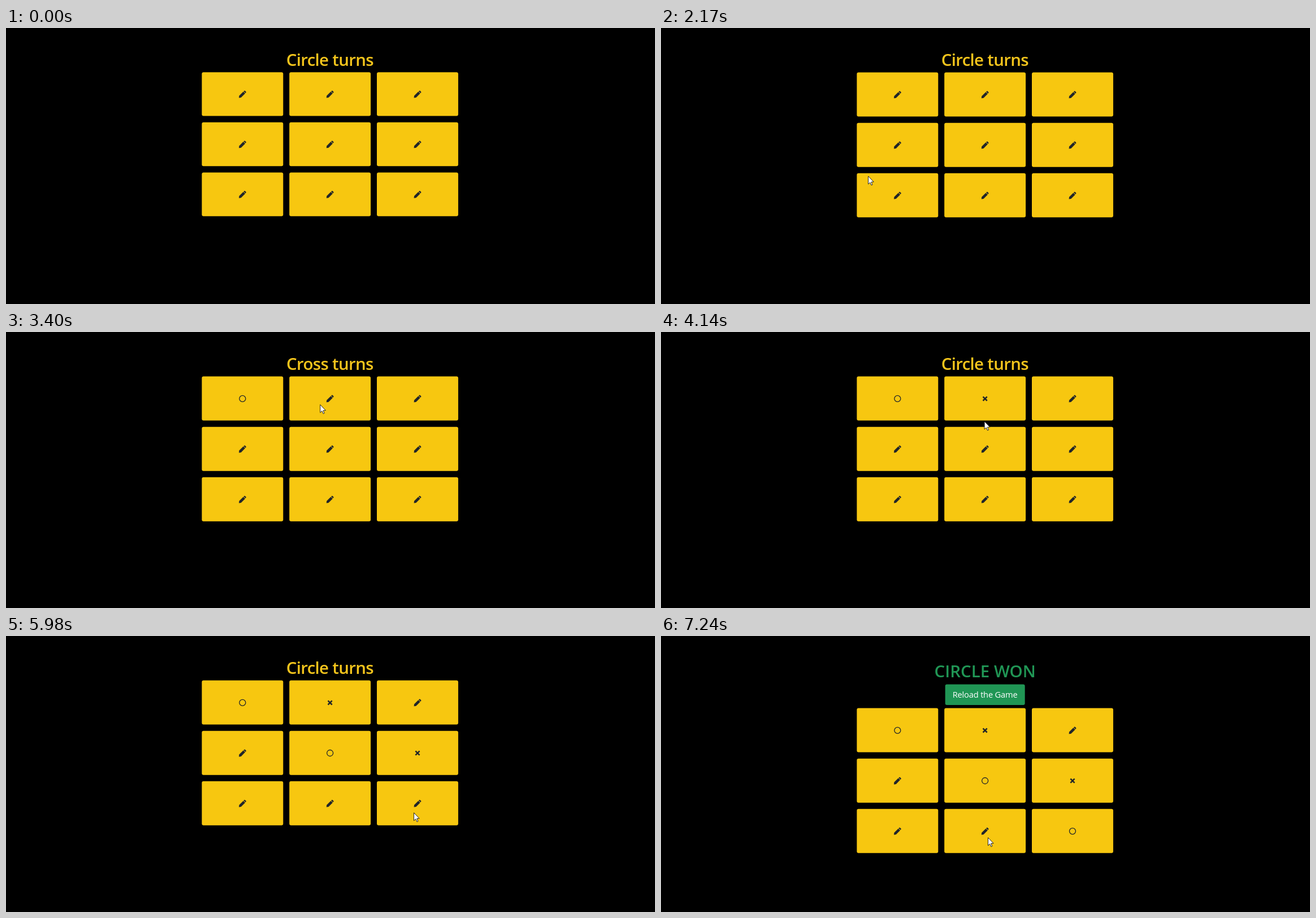
An HTML page with a canvas for the animation above (7990 ms loop, 1148 px wide and 488 px high).

```html
<!DOCTYPE html>
<html lang="en">
<head>
<meta charset="utf-8">
<title>Noughts and crosses</title>
<style>
html, body { margin: 0; width: 100%; height: 100%; overflow: hidden; background: #000; }
canvas { display: block; }
</style>
</head>
<body>
<canvas id="stage" width="1148" height="488"></canvas>
<script>
const ctx = document.getElementById('stage').getContext('2d');
const LOOP = 7990;
const YELLOW = '#f7c710', GREEN = '#209655', INK = '#212529';
const FONT = '"Open Sans", "Noto Sans", sans-serif';

const layouts = [
  { from: 0, top: 78.2, pitch: 88.6, height: 77.4, base: 66.6 },
  { from: 1370, top: 78.6, pitch: 89.1, height: 78, base: 67 },
  { from: 6170, top: 127.6, pitch: 89.1, height: 78, base: 73 }
];

const titles = [
  { from: 0, text: 'Circle turns' },
  { from: 2770, text: 'Cross turns' },
  { from: 3700, text: 'Circle turns' },
  { from: 4540, text: 'Cross turns' },
  { from: 5350, text: 'Circle turns' },
  { from: 6170, text: 'CIRCLE WON', won: true }
];

const turns = [
  { from: 2770, cell: 0, mark: ring },
  { from: 3700, cell: 1, mark: cross },
  { from: 4540, cell: 4, mark: ring },
  { from: 5350, cell: 5, mark: cross },
  { from: 6170, cell: 8, mark: ring }
];

// Pointer travels in discrete steps between rests.
const moves = [
  { from: 1880, to: 2610, steps: 11, a: [343, 321], b: [420, 123] },
  { from: 2960, to: 3480, steps: 10, a: [420, 123], b: [571, 128.6] },
  { from: 3970, to: 4540, steps: 8, a: [571, 128.6], b: [573, 220] },
  { from: 4850, to: 5190, steps: 6, a: [573, 220], b: [735, 222] },
  { from: 5680, to: 5980, steps: 4, a: [735, 222], b: [721, 312] },
  { from: 6740, to: 7240, steps: 9, a: [721, 312], b: [578, 356] }
];

const latest = (list, t) => list.filter(e => t >= e.from).pop();

function polygon(points) {
  ctx.beginPath();
  points.forEach(([x, y]) => ctx.lineTo(x, y));
  ctx.closePath();
}

function box(x, y, w, h, r, color) {
  ctx.beginPath();
  ctx.roundRect(x, y, w, h, r);
  ctx.fillStyle = color;
  ctx.fill();
}

function label(text, y, font, color, spacing) {
  ctx.font = font;
  ctx.letterSpacing = spacing + 'px';
  ctx.fillStyle = color;
  ctx.textAlign = 'center';
  ctx.fillText(text, 573.2 + spacing / 2, y);
}

function pencil() {
  ctx.fillStyle = INK;
  polygon([[-6.4, 6.4], [-5.9, 2.6], [1.4, -4.7], [4.7, -1.4], [-2.6, 5.9]]);
  ctx.fill();
  polygon([[2, -5.2], [3.3, -6.3], [4.3, -6.4], [6.4, -4.3], [6.3, -3.3], [5.2, -2]]);
  ctx.fill();
}

function ring() {
  ctx.strokeStyle = INK;
  ctx.lineWidth = 1.3;
  ctx.beginPath();
  ctx.arc(0, 0, 5.5, 0, Math.PI * 2);
  ctx.stroke();
}

function cross() {
  ctx.strokeStyle = INK;
  ctx.lineWidth = 2.5;
  ctx.beginPath();
  ctx.moveTo(-3.6, -3.6);
  ctx.lineTo(3.6, 3.6);
  ctx.moveTo(3.6, -3.6);
  ctx.lineTo(-3.6, 3.6);
  ctx.stroke();
}

function drawBoard(t, { top, pitch, height }) {
  const width = 143.9;
  for (let i = 0; i < 9; i++) {
    const x = 346.4 + (i % 3) * 154.8;
    const y = top + Math.floor(i / 3) * pitch;
    box(x, y, width, height, 3, YELLOW);
    const turn = turns.find(e => e.cell === i && t >= e.from);
    ctx.save();
    ctx.translate(x + width / 2, y + height / 2 + 0.3);
    (turn ? turn.mark : pencil)();
    ctx.restore();
  }
}

function drawPointer(t) {
  const move = latest(moves, t);
  if (!move) return;
  const { from, to, steps, a, b } = move;
  const gap = (to - from) / (steps - 1);
  const u = Math.min(steps, Math.floor((t - from) / gap + 0.001) + 1) / steps;
  const k = u * u * (3 - 2 * u);
  ctx.save();
  ctx.translate(a[0] + (b[0] - a[0]) * k + 0.5, a[1] + (b[1] - a[1]) * k + 0.5);
  polygon([[0, 0], [0, 14], [3.2, 11.1], [5.4, 16], [7.4, 15.1], [5.3, 10.3], [9.6, 10.1]]);
  ctx.fillStyle = '#fff';
  ctx.strokeStyle = '#111';
  ctx.lineWidth = 0.9;
  ctx.fill();
  ctx.stroke();
  ctx.restore();
}

function draw(t) {
  ctx.fillStyle = '#000';
  ctx.fillRect(0, 0, 1148, 488);
  const layout = latest(layouts, t);
  const { text, won } = latest(titles, t);
  label(text, layout.base, '600 29.5px ' + FONT, won ? GREEN : '#f5c51c', won ? 0 : -0.7);
  if (won) {
    box(502.7, 85.4, 141, 36.6, 3, GREEN);
    label('Reload the Game', 109.3, '400 14.7px ' + FONT, '#fff', -0.2);
  }
  drawBoard(t, layout);
  drawPointer(t);
}

const start = performance.now();
function tick() {
  draw((performance.now() - start) % LOOP);
  requestAnimationFrame(tick);
}
tick();
</script>
</body>
</html>
```
